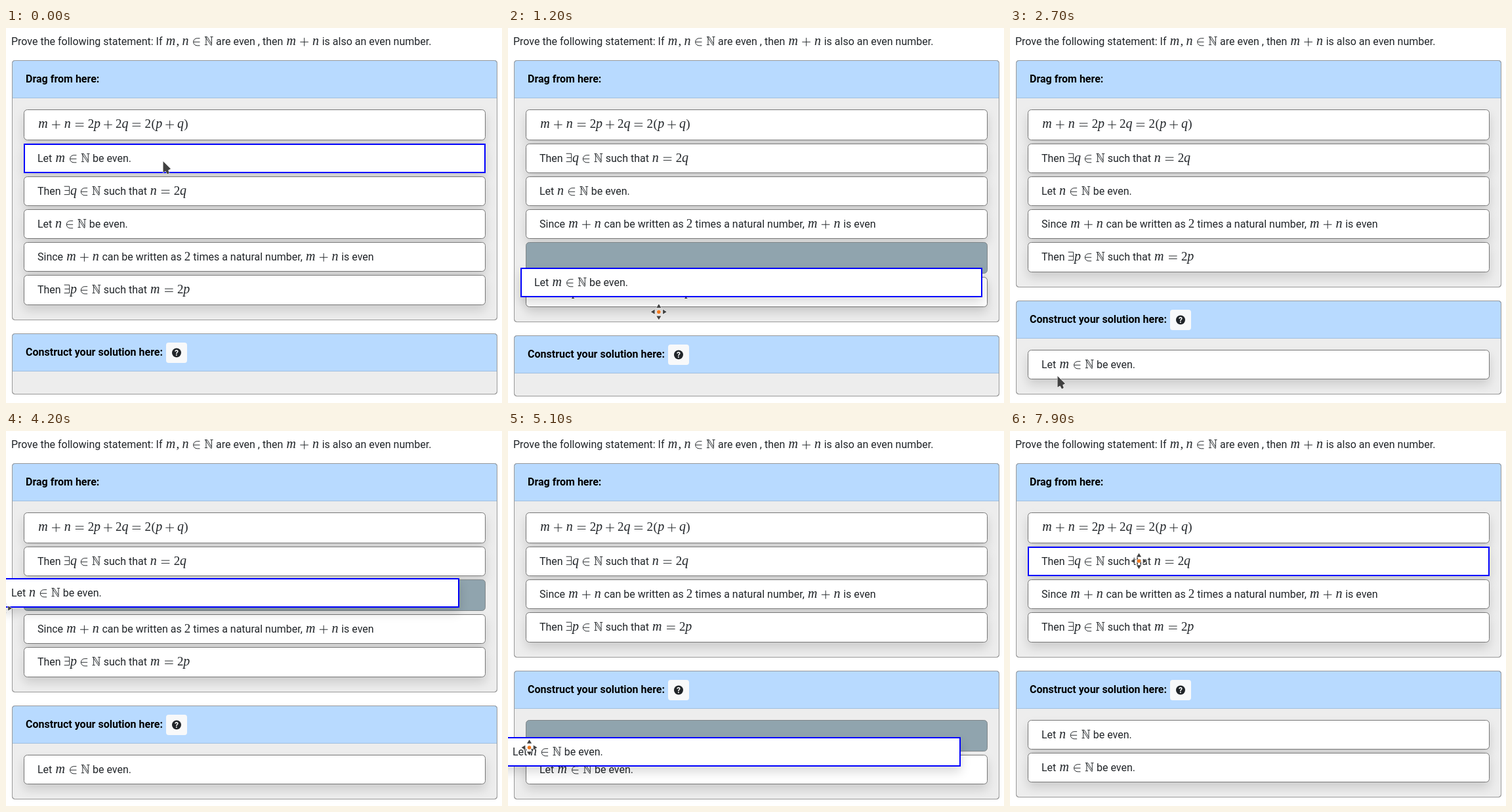
Recreate the animation shown at these times as an HTML page with a canvas. Size 756 px wide and 571 px high, loop 8000 ms.

```html
<!DOCTYPE html>
<html lang="en">
<head>
<meta charset="utf-8">
<title>Proof ordering exercise</title>
<style>
html, body { margin: 0; width: 100%; height: 100%; overflow: hidden; background: #fff; }
canvas { display: block; }
</style>
</head>
<body>
<canvas id="stage" width="756" height="571"></canvas>
<script>
const ctx = document.getElementById('stage').getContext('2d');
const LOOP = 8000, STEP = 100, EM = 19.04, INK = '#212529', BLUE = '#00f';
const SANS = 'Roboto, sans-serif', SERIF = '"Liberation Serif", serif';
const TOP = 49, HEAD = 58, INSET = 17, GAP = 5, BETWEEN = 20, LEFT = 27, WIDTH = 704;

const TITLE = 'Prove the following statement: If $m,n∈ℕ$ are even , then $m+n$ is also an even number.';
const LINES = {
  sum: '$m+n=2p+2q=2(p+q)$',
  letM: 'Let $m∈ℕ$ be even.',
  hasQ: 'Then $∃q∈ℕ$ such that $n=2q$',
  letN: 'Let $n∈ℕ$ be even.',
  end: 'Since $m+n$ can be written as $2$ times a natural number, $m+n$ is even',
  hasP: 'Then $∃p∈ℕ$ such that $m=2p$'
};

// Thin-stroked signs, and glyph widths in em where they are not half an em
const SIGNS = {
  '+': 'M1.1-4.75H13.7M7.4-11.1V1.6',
  '=': 'M1.1-6.9H13.7M1.1-2.6H13.7',
  '∈': 'M11.1-10.3H6.8A5.5 5.5 0 0 0 6.8 .8H11.1M1.4-4.75H11.1',
  '∃': 'M1-12.8H9V-.4H1M1.8-6.6H9',
  'ℕ': 'M.5-12.6H4.2L11-1.8V-12.6M9-12.6H13.2M2.6-12.6V-.4M.5-.4H4.7M1.6-12.3L10 .2H11V-1.8'
};
const WIDE = { m: .878, n: .6, '(': .389, ')': .389, ',': .278,
  '+': .778, '=': .778, '∈': .667, '∃': .556, 'ℕ': .722 };

// Pointer moves [start, end, x, y]; it rests in between
const START = [239, 203];
const MOVES = [
  [700, 1800, 225, 553], [2600, 2700, 72, 530], [2700, 2800, -80, 260],
  [3200, 3600, 40, 271], [4000, 4100, 0, 269], [4100, 4200, -3, 270],
  [4200, 5000, -1, 511], [5000, 5100, 32.5, 482], [5700, 6100, 185.5, 251],
  [6100, 6800, 225, 150], [7300, 7700, 197.5, 196], [7800, 7900, 196.5, 198]
];
const DRAGS = [
  { id: 'letM', home: 176, from: 800, to: 2200 },
  { id: 'letN', home: 226, from: 4100, to: 5300 }
];

function pointer(t) {
  let [x, y] = START;
  for (const [from, to, toX, toY] of MOVES) {
    if (t <= from) break;
    const f = Math.sin(Math.min(1, (t - from) / (to - from)) * Math.PI / 2);
    x += (toX - x) * f;
    y += (toY - y) * f;
  }
  return [x, y];
}

function box(x, y, w, h, radius, fill, stroke) {
  const inset = stroke ? .5 : 0;
  ctx.beginPath();
  ctx.roundRect(x + inset, y + inset, w - 2 * inset, h - 2 * inset, radius);
  ctx.fillStyle = fill;
  ctx.fill();
  ctx.shadowColor = 'transparent';
  if (stroke) { ctx.strokeStyle = stroke; ctx.lineWidth = 1; ctx.stroke(); }
}

function words(text, x, y, font, color = INK) {
  ctx.font = font;
  ctx.fillStyle = color;
  ctx.fillText(text, x, y);
  return x + ctx.measureText(text).width;
}

function centred(...args) {
  ctx.textAlign = 'center';
  words(...args);
  ctx.textAlign = 'left';
}

function math(text, x, y) {
  for (const c of text) {
    const w = (WIDE[c] || .5) * EM;
    const space = c === '+' ? .222 * EM : /[=∈]/.test(c) ? .278 * EM : 0;
    x += space;
    if (SIGNS[c]) {
      ctx.save();
      ctx.translate(x, y);
      ctx.strokeStyle = INK;
      ctx.lineWidth = .95;
      ctx.stroke(new Path2D(SIGNS[c]));
      ctx.restore();
    } else {
      centred(c, x + w / 2, y, (/[a-z]/.test(c) ? 'italic 20px ' : '19px ') + SERIF);
    }
    x += w + (c === ',' ? .167 * EM : space);
  }
  return x;
}

function line(text, x, y) {
  text.split('$').forEach((part, i) => {
    x = i % 2 ? math(part, x, y) : words(part, x, y, '16px ' + SANS);
  });
}

const heightOf = id => id === 'hole' ? 48 : id === 'sum' ? 47 : 45;
const listHeight = ids => ids.reduce((sum, id) => sum + heightOf(id) + GAP, 0);
const panelHeight = ids => HEAD + 2 * INSET + 1 + listHeight(ids);

function card(id, x, y, active, extra = 0) {
  const h = heightOf(id) + extra;
  if (id === 'hole') return box(x, y, WIDTH, h, 5, '#90a4ae', '#808689');
  ctx.shadowColor = 'rgba(0,0,0,.15)';
  ctx.shadowBlur = 16;
  ctx.shadowOffsetY = 8;
  if (active) {
    box(x, y, WIDTH, h, 0, BLUE);
    box(x + 2, y + 2, WIDTH - 4, h - 4, 0, '#fff');
  } else box(x, y, WIDTH, h, 5, '#fff', '#777');
  line(LINES[id], x + 21, y + 28);
}

// The last card grows by `extra`; returns whether a card is hovered
function panel(top, label, ids, extra, [px, py]) {
  const height = panelHeight(ids) + extra;
  box(9, top, 740, height, 4, '#ededed', '#999');
  box(9, top, 740, HEAD, [4, 4, 0, 0], '#b8daff', '#a1bfdf');
  box(9, top, 740, height, 4, 'transparent', '#999');
  words(label, 30, top + 34, 'bold 16px ' + SANS, '#000');
  let y = top + HEAD + INSET, hit = false;
  ids.forEach((id, i) => {
    const h = heightOf(id), over = px >= LEFT && px < LEFT + WIDTH && py >= y && py < y + h;
    card(id, LEFT, y, over, i === ids.length - 1 ? extra : 0);
    hit = hit || over;
    y += h + GAP;
  });
  return hit;
}

function helpButton(top) {
  box(244, top + 14, 32, 31, 4, '#f8f9fa');
  box(253, top + 22.5, 14, 14, 7, INK);
  centred('?', 260, top + 33.5, 'bold 12px ' + SANS, '#fff');
}

function cursor(x, y, moving) {
  ctx.save();
  ctx.translate(x, y);
  ctx.fillStyle = '#414141';
  ctx.strokeStyle = 'rgba(255,255,255,.85)';
  ctx.lineWidth = 1.2;
  const shape = new Path2D(moving ? 'M0-12L3.6-6.2H-3.6Z'
    : 'M.5 0V17L4.3 14.8L7 19.5L9.8 18L8.2 13.4L12 11.6Z');
  for (let i = 0; i < (moving ? 4 : 1); i++) {
    ctx.stroke(shape);
    ctx.fill(shape);
    ctx.rotate(Math.PI / 2);
  }
  if (moving) {
    ctx.beginPath();
    ctx.arc(0, 0, 2.8, 0, 7);
    ctx.fillStyle = '#f0781e';
    ctx.stroke();
    ctx.fill();
  }
  ctx.restore();
}

function draw(t) {
  const drag = DRAGS.find(d => t >= d.from && t < d.to);
  const solved = DRAGS.filter(d => t >= d.to).map(d => d.id).reverse();
  const source = Object.keys(LINES).filter(id => !solved.includes(id) && !(drag && id === drag.id));
  // Cards and highlighting trail the pointer by one step
  const trail = pointer(t - STEP);
  let x, y;
  if (drag) {
    const grab = pointer(drag.from - STEP);
    x = Math.round(LEFT + trail[0] - grab[0]);
    y = Math.round(drag.home + trail[1] - grab[1]);
    const lowerList = TOP + panelHeight([...source, 'hole']) + BETWEEN + HEAD;
    const slot = Math.floor((y - 120) / 50);
    if (trail[1] > lowerList) solved.unshift('hole');
    else source.splice(slot, 0, 'hole');
  }

  ctx.fillStyle = '#fff';
  ctx.fillRect(0, 0, 756, 571);
  line(TITLE, 8, 26);
  const hover = drag ? [-1, -1] : trail;
  const lowerTop = TOP + panelHeight(source) + 1 + BETWEEN;
  const hitUpper = panel(TOP, 'Drag from here:', source, 1, hover);
  const hitLower = panel(lowerTop, 'Construct your solution here:', solved, 0, hover);
  helpButton(lowerTop);
  if (drag) card(drag.id, x, y, true);
  cursor(...pointer(t), drag || (t >= 600 && (hitUpper || hitLower)));
}

function tick(now) {
  draw(Math.floor(now % LOOP / STEP) * STEP);
  requestAnimationFrame(tick);
}
requestAnimationFrame(tick);
</script>
</body>
</html>
```
